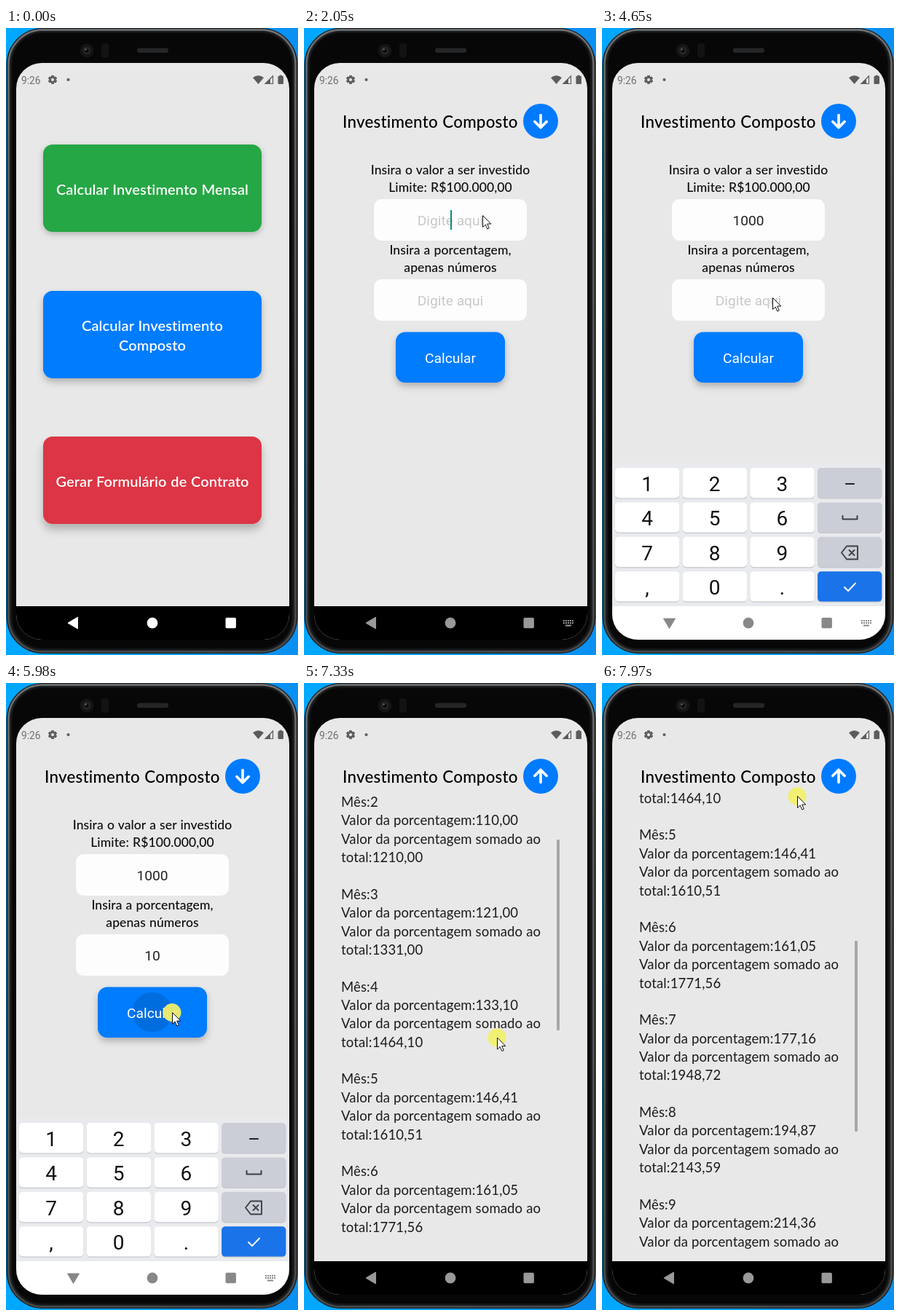
Recreate the animation shown at these times as an HTML page. Size 401 by 861 pixels, loop 8000 ms.

```html
<!DOCTYPE html>
<html lang="pt">
<head>
<meta charset="utf-8">
<title>Investimento Composto</title>
<style>
html, body { margin: 0; width: 100%; height: 100%; overflow: hidden; background: #0a96f6; }
svg { display: block; width: 401px; height: 861px; }
text { font-family: Roboto, sans-serif; }
.mid { text-anchor: middle; }
.lato { font-family: Lato, sans-serif; font-variant-ligatures: none; letter-spacing: .1px; word-spacing: .6px; }
.btn { font-size: 20px; font-weight: 600; fill: #fff; }
.title { font-size: 22.3px; font-weight: 500; letter-spacing: .25px; }
.label { font-size: 17.5px; font-weight: 500; fill: #0c0c0c; }
.row { font-size: 18.5px; fill: #1c1c1c; letter-spacing: .15px; word-spacing: 0; }
.field { font-size: 19.2px; }
.key { font-size: 28px; fill: #111; }
</style>
</head>
<body>
<svg id="stage" viewBox="0 0 401 861" xmlns="http://www.w3.org/2000/svg"></svg>
<script>
const stage = document.getElementById('stage');
const BLUE = '#007bff';

// Markup helpers
const rect = (x, y, w, h, r, fill, extra = '') =>
  `<rect x="${x}" y="${y}" width="${w}" height="${h}" rx="${r}" fill="${fill}" ${extra}/>`;
const text = (x, y, cls, s, extra = '') =>
  `<text x="${x}" y="${y}" class="${cls}" ${extra}>${s}</text>`;
const line = (d, color, w) =>
  `<path d="${d}" fill="none" stroke="${color}" stroke-width="${w}" stroke-linecap="round" stroke-linejoin="round"/>`;
const shadow = (id, dy, blur) =>
  `<filter id="${id}" x="-20%" y="-30%" width="140%" height="180%">
    <feDropShadow dx="0" dy="${dy}" stdDeviation="${blur}" flood-color="#000" flood-opacity=".24"/></filter>`;
const clip = (id, shape) => `<clipPath id="${id}">${shape}</clipPath>`;

function phone() {
  return rect(0.5, 0, 400, 859, 50, '#1d1f20') +
    rect(3.5, 2.5, 394, 854, 47, '#222425', 'stroke="url(#rim)" stroke-width="2.4"') +
    rect(7.5, 6, 386, 847, 43, '#070707', 'stroke="#141516" stroke-width="2"') +
    '<circle cx="111" cy="31" r="9.5" fill="#141414"/><circle cx="111" cy="31" r="5.5" fill="#242526"/>' +
    '<circle cx="111" cy="31" r="2.6" fill="#090909"/><circle cx="109.6" cy="29.4" r="1.2" fill="#66696b"/>' +
    rect(131, 21, 10, 20, 4, '#131313') + rect(180, 27.5, 43, 6.5, 3, '#252627');
}

function statusBar() {
  let teeth = '';
  for (let a = 0; a < 360; a += 60)
    teeth += rect(62.2, 65, 3.6, 12, 0.8, '#606060', `transform="rotate(${a} 64 71)"`);
  return text(21, 76.5, '', '9:26', 'font-size="13.8" fill="#707070"') + teeth +
    '<circle cx="64" cy="71" r="3.3" fill="none" stroke="#606060" stroke-width="2.8"/>' +
    '<circle cx="64" cy="71" r="2" fill="#e8e8e8"/>' +
    '<circle cx="85.5" cy="71" r="2.1" fill="#606060"/>' +
    '<path d="M339 68.3Q346.5 62 354 68.3L346.5 77Z" fill="#5c5c5c"/>' +
    '<path d="M356 76.5L366.5 66V76.5Z" fill="none" stroke="#5c5c5c" stroke-width="1.2"/>' +
    '<path d="M355.5 77L363 69.5V77Z" fill="#5c5c5c"/>' +
    rect(373.5, 66, 7.5, 11, 1, '#5c5c5c') + rect(375.5, 64.8, 3.5, 2, 0, '#5c5c5c');
}

function home() {
  const card = (y, fill, n) => rect(51, y, 300, 120, 13, fill, `filter="url(#sh${n})"`);
  return card(160, '#28a745', 1) + card(361, BLUE, 2) + card(561, '#dc3545', 3) +
    '<circle id="ripple1" clip-path="url(#cCard)" cy="421" fill="#000" fill-opacity=".125"/>' +
    [[228.5, 'Calcular Investimento Mensal'], [415.5, 'Calcular Investimento'],
     [443, 'Composto'], [629.5, 'Gerar Formulário de Contrato']]
      .map(([y, s]) => text(201, y, 'lato btn mid', s)).join('');
}

function form() {
  const field = (n, y) => rect(96, y, 210, 57, 11, '#fdfdfd') +
    text(201, y + 36, 'field mid', '', `id="field${n}"`) +
    rect(201, y + 15, 2, 27, 0, '#0a8d7c', `id="caret${n}"`);
  return [[201, 'Insira o valor a ser investido'], [225, 'Limite: R$100.000,00'],
          [311, 'Insira a porcentagem,'], [335, 'apenas números']]
      .map(([y, s]) => text(201, y, 'lato label mid', s)).join('') +
    field(1, 235) + field(2, 345) +
    rect(126, 417.5, 150, 69.5, 13, BLUE, 'filter="url(#sh2)"') +
    '<circle id="ripple2" clip-path="url(#cCalc)" cx="201" cy="452" fill="#000" fill-opacity=".125"/>' +
    text(201, 460, 'field mid', 'Calcular', 'fill="#fff"');
}

function list() {
  const money = v => v.toFixed(2).replace('.', ',');
  let out = '', total = 1000;
  for (let m = 1; m <= 12; m++) {
    const gain = total * 0.1;
    total += gain;
    ['Mês:' + m, 'Valor da porcentagem:' + money(gain),
     'Valor da porcentagem somado ao', 'total:' + money(total)]
      .forEach((s, i) => { out += text(51, 197.2 + (m - 1) * 126.85 + i * 25.4, 'lato row', s); });
  }
  return `<g clip-path="url(#cList)"><g id="rows">${out}</g>` +
    rect(347, 151, 4, 262, 1, '#a7a7a7', 'id="bar"') + '</g>';
}

function keyboard() {
  let out = rect(14, 598, 375, 197, 0, '#e8eaed');
  ['123-', '456_', '789<', ',0.>'].forEach((keys, r) => [...keys].forEach((k, c) => {
    const x = 18 + c * 92.7, y = 604 + r * 47.4;
    const fill = c < 3 ? '#fff' : r < 3 ? '#cbced6' : '#1a73e8';
    out += rect(x, y + 1, 88.3, 41.6, 5, '#c3c6cb') + rect(x, y, 88.3, 41.4, 5, fill);
    if (c < 3) out += text(x + 44, y + 32, 'key mid', k);
  }));
  return out + line('M335 626H346', '#222', 2) + line('M330.5 670V674.5H350.5V670', '#3c4043', 2) +
    line('M336 711.5H351V729.5H336L329 720.5ZM339.5 717L346.5 724M346.5 717L339.5 724', '#3c4043', 1.9) +
    line('M333 768L338 773L348 762.5', '#fff', 2);
}

function navBar() {
  let dots = '';
  for (let r = 0; r < 2; r++)
    for (let c = 0; c < 5; c++) dots += rect(356 + c * 3, 813 + r * 3, 2, 2, 0, 'currentColor');
  return rect(14, 794, 375, 46, 0, '#000') + rect(14, 794, 375, 46, 0, '#fff', 'id="navWhite"') +
    '<g id="icons" fill="currentColor">' +
    '<path id="back" d="M85 817L98.5 809V825Z" stroke="currentColor" stroke-linejoin="round"/>' +
    '<circle cx="201" cy="817" r="7.4"/>' + rect(301.5, 809.8, 14.4, 14.4, 1.8, 'currentColor') +
    `<g id="kbIcon">${dots}${rect(359, 819.5, 8, 2, 0, 'currentColor')}</g></g>`;
}

stage.innerHTML = `<defs>
  <linearGradient id="sky"><stop offset="0" stop-color="#00a8ff"/><stop offset="1" stop-color="#0a90f2"/></linearGradient>
  <linearGradient id="rim" x2="0" y2="1"><stop offset="0" stop-color="#707375"/>
    <stop offset=".25" stop-color="#5e6163"/><stop offset="1" stop-color="#484b4d"/></linearGradient>
  ${shadow('sh1', 3, 4)}${shadow('sh2', 5, 5)}${shadow('sh3', 8, 6)}
  ${clip('cScreen', rect(14, 48, 375, 792, 35, '#000'))}
  ${clip('cKeys', rect(14, 48, 375, 747, 0, '#000'))}
  ${clip('cList', rect(51, 151, 300, 632, 0, '#000'))}
  ${clip('cCard', rect(51, 361, 300, 120, 13, '#000'))}
  ${clip('cCalc', rect(126, 417.5, 150, 69.5, 13, '#000'))}
</defs>
${rect(0, 0, 401, 861, 0, 'url(#sky)')}${phone()}
<g clip-path="url(#cScreen)">
  ${rect(14, 48, 375, 792, 0, '#e8e8e8')}
  <g id="home">${home()}</g>
  <g id="page">
    ${text(53, 137, 'lato title', 'Investimento Composto')}
    <circle cx="325" cy="128" r="24" fill="${BLUE}"/>
    <g id="arrow">${line('M325 119.5V136M316.8 128.6L325 136.8L333.2 128.6', '#fff', 3.6)}</g>
    <g id="form">${form()}</g><g id="list">${list()}</g>
  </g>
  ${statusBar()}
  <g clip-path="url(#cKeys)"><g id="keys">${keyboard()}</g></g>
  ${navBar()}
</g>
<g id="cursor">
  <circle id="press" cx="0" cy="0.5" r="12.5" fill="#f2f068" fill-opacity=".93"/>
  <path d="M0.5 0.5V16.5L4.2 13L6.8 19L9.3 17.9L6.7 12H11.8Z" fill="#fff" stroke="#111" stroke-width="1"/>
</g>`;

const el = {};
stage.querySelectorAll('[id]').forEach(n => { el[n.id] = n; });

const set = (id, name, v) => el[id].setAttribute(name, v);
const show = (id, on) => set(id, 'visibility', on ? 'inherit' : 'hidden');
const ramp = (t, a, b) => Math.min(1, Math.max(0, (t - a) / (b - a)));
const ease = k => k * k * (3 - 2 * k);
const out = k => 1 - (1 - k) ** 3;
const within = (t, spans) => spans.some(([a, b]) => t >= a && t < b);

const DRAG = 7000, TOP = 639;
// Pointer stops: time, x, y
const path = [
  [30, 376, 540], [560, 218, 412], [1080, 218, 412], [1640, 239, 214], [1690, 239, 214],
  [1900, 245, 257], [3650, 245, 257], [4000, 234, 370], [5470, 234, 370], [5880, 228, 452],
  [6240, 228, 452], [6520, 259, 500], [6570, 259, 500], [6930, 263, TOP], [DRAG, 263, TOP],
  [7330, 265, 487], [7970, 268, 155]
];
const clicks = [[640, 750], [1860, 1950], [4010, 4090], [5930, 6030], [6960, 8000]];
const typed1 = [[2710, '1'], [2790, '10'], [2940, '100'], [3120, '1000']];
const typed2 = [[4780, '1'], [4930, '10']];
const carets1 = [[1950, 2510], [2710, 3650]];
const carets2 = [[4090, 4650], [4780, 5470]];

function pointer(t) {
  const i = path.findIndex(p => p[0] > t);
  if (i < 0) return path[path.length - 1].slice(1);
  if (!i) return path[0].slice(1);
  const [a, x, y] = path[i - 1], [b, u, v] = path[i];
  const k = a >= DRAG ? ramp(t, a, b) : ease(ramp(t, a, b));
  return [x + (u - x) * k, y + (v - y) * k];
}

function fill(n, t, keys, carets) {
  const s = keys.reduce((cur, [at, v]) => t >= at ? v : cur, '');
  el['field' + n].textContent = s || 'Digite aqui';
  set('field' + n, 'fill', s ? '#222' : '#c8c8c8');
  set('caret' + n, 'x', 201 + s.length * 5.4);
  show('caret' + n, within(t, carets));
}

function zoom(id, k, opacity) {
  set(id, 'transform', `translate(201 444) scale(${k}) translate(-201 -444)`);
  set(id, 'opacity', opacity);
  show(id, opacity > 0);
}

function draw(t) {
  const [x, y] = pointer(t);
  set('cursor', 'transform', `translate(${x.toFixed(1)} ${y.toFixed(1)})`);
  show('cursor', t >= 30);
  show('press', within(t, clicks));

  // Home to form
  const go = ramp(t, 900, 1250);
  zoom('home', 1 + 0.1 * out(go), 1 - ramp(t, 900, 1050));
  zoom('page', 0.88 + 0.12 * out(go), ramp(t, 930, 1100));
  show('ripple1', t >= 620);
  set('ripple1', 'cx', 218 - 17 * ramp(t, 620, 850));
  set('ripple1', 'r', Math.max(0, Math.min(175, 150 + (t - 850) * 0.48)));

  fill(1, t, typed1, carets1);
  fill(2, t, typed2, carets2);
  show('ripple2', t >= 5960);
  set('ripple2', 'r', 20 + 70 * ramp(t, 5960, 6160));

  // Result list
  const done = t >= 6200;
  show('form', !done);
  show('list', done);
  set('arrow', 'transform', done ? 'matrix(1 0 0 -1 0 256)' : '');
  const scroll = t < DRAG ? 0 : (TOP - y) * 1.0105;
  set('rows', 'transform', `translate(0 ${-scroll.toFixed(1)})`);
  set('bar', 'y', 151 + scroll * 0.415);
  show('bar', done && scroll > 4);

  // Keyboard and navigation bar
  const up = out(ramp(t, 2090, 2380)) * (1 - ease(ramp(t, 6210, 6420)));
  set('keys', 'transform', `translate(0 ${(1 - up) * 197})`);
  show('keys', up > 0);
  set('navWhite', 'opacity', up);
  set('back', 'transform', `rotate(${-90 * up} 92.5 817)`);
  const tone = Math.round(255 - 102 * ramp(t, 780, 1100) - 17 * up);
  set('icons', 'color', `rgb(${tone},${tone},${tone})`);
  show('kbIcon', t >= 2000 && t < 6260);
}

function tick(now) {
  draw(now % 8000);
  requestAnimationFrame(tick);
}
draw(0);
requestAnimationFrame(tick);
</script>
</body>
</html>
```
